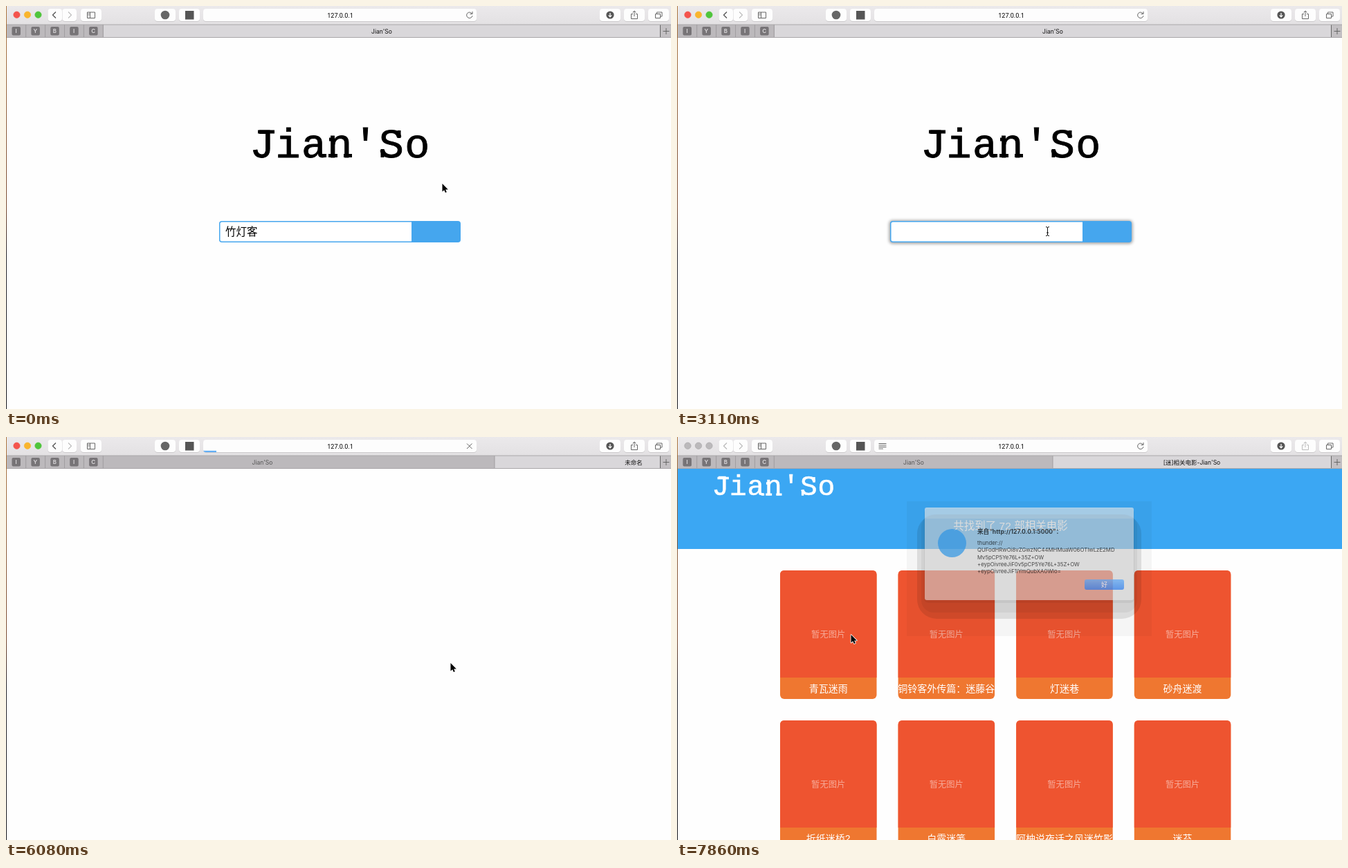
An HTML page for the animation above (8000 ms loop, 961 by 583 pixels).

```html
<!DOCTYPE html>
<html lang="zh-CN">
<head>
<meta charset="utf-8">
<title>Jian'So</title>
<style>
html, body { margin: 0; width: 100%; height: 100%; overflow: hidden; background: #fefefe; }
svg { display: block; width: 961px; height: 583px; }
text { font-family: "Liberation Sans", "Noto Sans CJK SC", "Noto Sans CJK", sans-serif; white-space: pre; }
.mid { text-anchor: middle; }
.tab { font: 8.5px Inter, "Noto Sans CJK SC", "Noto Sans CJK", sans-serif; text-anchor: middle; }
.mark text { font: 60px "Liberation Mono", monospace; letter-spacing: 1.3px; stroke-width: .9; }
.mark path { fill: none; stroke-width: 5; }
.cand { font-size: 13px; font-weight: 300; fill: #555; }
.alert text { font-family: Inter, "Noto Sans CJK SC", "Noto Sans CJK", sans-serif; font-size: 7.8px; }
.line { fill: none; stroke: #666; }
</style>
</head>
<body>
<svg viewBox="0 0 961 583">
  <defs>
    <linearGradient id="bar" x2="0" y2="1"><stop stop-color="#ebe9eb"/><stop offset="1" stop-color="#e3e1e3"/></linearGradient>
    <linearGradient id="edge" x2="0" y2="1">
      <stop stop-color="#b0783f"/><stop offset=".3" stop-color="#8a5a38"/><stop offset=".5" stop-color="#7a4a30"/>
      <stop offset=".62" stop-color="#25242c"/><stop offset="1" stop-color="#15161c"/>
    </linearGradient>
    <linearGradient id="ok" x2="0" y2="1"><stop stop-color="#5aa8f8"/><stop offset="1" stop-color="#2577ee"/></linearGradient>
    <filter id="blur" x="-10%" y="-50%" width="120%" height="200%"><feGaussianBlur stdDeviation="2"/></filter>
    <clipPath id="tabClip"><rect x="141" y="27" width="804" height="18"/></clipPath>
    <clipPath id="urlClip"><rect x="285" y="4" width="395" height="18" rx="4"/></clipPath>
    <g id="word" class="mark">
      <text x="352.3" y="218.5">Jian'So</text>
      <path d="M364 182H388M467 193H475M466 216.5H479M488 216.5H500M457 216.5H463M568 180V191M544 207V219"/>
    </g>
  </defs>
  <rect width="961" height="583" fill="#fefefe"/>

  <g id="home">
    <use href="#word" fill="#000" stroke="#000"/>
    <rect id="glow" x="306.5" y="310" width="352" height="34" rx="5" fill="#000" opacity=".36" filter="url(#blur)"/>
    <rect x="308" y="311" width="349" height="31" rx="4" fill="#45a6ee"/>
    <path d="M586 312.5V340.5H312Q309.5 340.5 309.5 338V315Q309.5 312.5 312 312.5Z" fill="#fff"/>
    <text id="query" x="317" y="332" font-size="15.5"></text>
    <rect id="under" x="317" y="334" height="1"/>
    <rect id="caret" y="317" width="1" height="19"/>
    <g id="ime">
      <rect id="panel" x="317" y="342" height="22" fill="#fff"/>
      <g id="cands"></g>
      <g id="badge">
        <path d="M-31.5-4l2-2 2 2z" fill="#bbb"/><path d="M-31.5 2l2 2.5 2-2.5z" fill="#f0703a"/>
        <circle cy="1" r="17.5" fill="#000" opacity=".14"/><circle r="17" fill="#fff"/><circle r="15.8" fill="#ec6030"/>
      </g>
    </g>
  </g>

  <g id="results">
    <rect y="45" width="961" height="117" fill="#3ba7f3"/>
    <use href="#word" fill="#fff" stroke="#fff" transform="translate(-190.5 -65) scale(.684)"/>
    <text class="mid" x="482" y="134" font-size="15.5" fill="#fff">共找到了 72 部相关电影</text>
    <g id="cards"></g>
  </g>

  <rect width="961" height="27" fill="url(#bar)"/>
  <rect y="27" width="961" height="18" fill="#bcb9bc"/>
  <g clip-path="url(#tabClip)">
    <rect id="tabB" y="27" width="804" height="18" fill="#d9d7da"/>
    <rect id="tabLine" y="27" width="1" height="18" fill="#a09da0"/>
    <text id="nameA" class="tab" y="39.5">Jian'So</text>
    <text id="nameB" class="tab" y="39.5" fill="#111"></text>
  </g>
  <rect y="26.5" width="961" height="1" fill="#aaa7aa"/>
  <rect y="45" width="961" height="1" fill="#a9a6a9"/>
  <rect x="945" y="28" width="16" height="17" fill="#c3c0c3"/>
  <path d="M945.5 27.5V45M949.5 36.5H958.5M954 32V41" class="line"/>
  <g id="pins"></g>
  <g id="lights"></g>
  <g id="buttons"></g>
  <path id="back" class="line" d="M72 8.5L67.5 13 72 17.5" stroke-width="1.3"/>
  <path class="line" d="M90 8.5L94.5 13 90 17.5" stroke-width="1.1" style="stroke:#bbb"/>
  <path class="line" d="M117.5 9H128.5V17.5H117.5ZM121.5 9V17.5M118.5 11H120.5M118.5 13H120.5"/>
  <circle cx="230" cy="13" r="6.3" fill="#666"/>
  <rect x="259" y="7" width="12.5" height="12.5" fill="#555"/>
  <text class="mid" x="483" y="17" style="font:9px Roboto,sans-serif">127.0.0.1</text>
  <path id="reader" class="line" d="M291.5 9.5H302.5M291.5 12H302.5M291.5 14.5H302.5M291.5 17H298"/>
  <path id="reload" class="line" d="M673.5 11.2A4.2 4.2 0 1 0 674 14M674 8V11.5H670.5"/>
  <path id="stop" class="line" d="M666 9.5L673.5 17M673.5 9.5L666 17"/>
  <g clip-path="url(#urlClip)"><rect id="load" x="285" y="19.8" height="2.2"/></g>
  <circle cx="873" cy="13" r="5.6" fill="#555"/>
  <path d="M873 10V15.5M870.7 13.4L873 15.8 875.3 13.4" fill="none" stroke="#fff" stroke-width="1.2"/>
  <path id="share" class="line" d="M906 11.5H903.5V18.5H912.5V11.5H910M908 15V7.5M905.5 9.5L908 7 910.5 9.5"/>
  <path class="line" d="M938.5 11.5H945.5V17.5H938.5ZM940.5 11.5V9H948V15H945.5"/>
  <rect width="1" height="583" fill="url(#edge)"/>

  <g id="alert" class="alert">
    <path d="M332 93H686V288H332Z" opacity=".035"/>
    <rect x="347" y="112" width="324" height="151" rx="28" opacity=".1"/>
    <rect x="353" y="112" width="312" height="142" rx="18" opacity=".05"/>
    <rect x="357" y="104" width="304" height="136" rx="6" opacity=".05"/>
    <rect x="358" y="102" width="302" height="134" rx="3" fill="#efefef" opacity=".52"/>
    <rect x="358" y="102" width="302" height="16" rx="3" fill="#ddd" opacity=".2"/>
    <g opacity=".68">
      <circle cx="397.5" cy="153.5" r="20.5" fill="#2a93e4"/>
      <text x="434" y="139.5" style="font-size:8.6px;font-weight:700">来自“http://127.0.0.1:5000”：</text>
      <g id="link"></g>
      <rect x="589" y="206" width="57" height="15" rx="3" fill="url(#ok)"/>
      <text class="mid" x="617.5" y="217" fill="#fff" style="font-size:9px">好</text>
    </g>
  </g>

  <g id="cursor">
    <g id="arrow">
      <path d="M0 0V11.6L2.7 9.2 4.4 13 6.3 12.2 4.7 8.4H8.3Z" stroke="#fff" stroke-width="1.6" stroke-linejoin="round" paint-order="stroke"/>
    </g>
    <path id="beam" d="M-2.5-6.5Q0-6.5 0-5V5Q0 6.5-2.5 6.5M2.5-6.5Q0-6.5 0-5V5Q0 6.5 2.5 6.5M-1.5 2H1.5" fill="none" stroke="#111" stroke-width="1"/>
    <path id="hand" d="M-3.2 1V-5Q-3.2-6.4-2-6.4T-.8-5V-1.8Q.6-2.8 1.5-1.6 2.8-2.3 3.6-1 5.3-1.2 5.3.6V3Q5 5 4 6.5H-1.5Q-2.4 4.6-4.9 1.8-5.8.3-4.6-.1-3.8 0-3.2 1ZM.2 2V4.5M2 2V4.5" fill="#fff" stroke="#111" stroke-width="1" stroke-linejoin="round"/>
  </g>
</svg>
<script>
const $ = id => document.getElementById(id);
const set = (id, attrs) => { for (const k in attrs) $(id).setAttribute(k, attrs[k]); };
const show = (id, on) => { $(id).style.display = on ? "" : "none"; };
const fill = (id, list, draw) => { $(id).innerHTML = list.map(draw).join(""); };
const at = (table, t) => table.filter(row => row[0] <= t).pop();

const LOOP = 8000;
const films = ["青瓦迷雨", "铜铃客外传篇：迷藤谷", "灯迷巷", "砂舟迷渡",
  "折纸迷桥2", "白露迷笺", "阿柚说夜话之风迷竹影", "迷苔"];
const link = ["thunder://", "QUFodHRwOi8vZGwzNC44MHMuaW06OTIwLzE2MD", "Mv5pCP5Ye76L+35Z+OW",
  "+eypOivreeJiF0v5pCP5Ye76L+35Z+OW", "+eypOivreeJiF1lYmQubXA0Wlo="];

// time, shape, x, y
const pointer = [
  [0, "arrow", 630.5, 257], [600, "arrow", 626, 260], [740, "arrow", 612, 272], [890, "arrow", 590, 291],
  [1040, "beam", 566, 318], [1190, "beam", 544, 325], [1330, "beam", 535.5, 326],
  [5050, "hand", 600, 335], [5190, "hand", 632, 339.5], [5340, "hand", 652, 338], [5490, "hand", 657, 335],
  [5640, "hand", 651, 333], [5790, "hand", 646, 333], [6080, "arrow", 642.5, 327],
  [6670, "hand", 615, 330], [6820, "hand", 540, 328], [6970, "hand", 450, 326], [7110, "hand", 367, 324],
  [7260, "arrow", 300, 303], [7410, "hand", 253.5, 294], [7710, "arrow", 251.5, 286]
];
// time, text, caret x (0 = hidden)
const typing = [
  [0, "竹灯客", 0], [1330, "竹灯客", 364], [1770, "竹灯客", 0], [2220, "竹灯", 348], [2370, "竹", 333],
  [2660, "", 317], [3110, "", 0], [3560, "m", 330], [3700, "mi", 333.5], [4300, "迷", 333],
  [4750, "迷", 0], [5340, "迷", 333], [5790, "迷", 0]
];
// time, left edge of the new tab, centre of the old tab's name, progress width
const tabs = [
  [0, 141, 543, 0], [6080, 706, 370.5, 19], [6230, 559, 341.5, 82], [6370, 543, 342, 180],
  [6520, 543, 342, 394], [6670, 543, 342, 0]
];
const offers = {
  m: { words: ["吗", "没有", "妈妈", "美丽", "每天"], shift: 58 },
  mi: { words: ["迷", "米", "密", "咪", "蜜"], shift: 0 }
};

fill("cards", films, (name, i) => {
  const x = 149 + i % 4 * 170.6, y = i < 4 ? 193 : 410, mid = x + 69.7;
  return `<rect x="${x}" y="${y}" width="139.5" height="186" rx="6" fill="#ef7730"/>
    <path d="M${x} ${y + 155}v-149q0-6 6-6h127.5q6 0 6 6v149z" fill="#ee5430"/>
    <text class="mid" x="${mid}" y="${y + 97}" font-size="12.3" fill="#fff" opacity=".5">暂无图片</text>
    <text class="mid" x="${mid}" y="${y + 175.5}" font-size="14" fill="#fff">${name}</text>`;
});
fill("pins", [..."IYBIC"], (c, i) => {
  const x = 14.5 + i * 27.9;
  return `<rect x="${x - 6}" y="30" width="12.5" height="12.5" rx="2" fill="#777477"/>
    <text class="tab" x="${x}" y="39.3" fill="#dedcde" style="font-weight:600;font-size:8px">${c}</text>
    <rect x="${x + 13.7}" y="27" width="1" height="18" fill="#a09da0"/>`;
});
fill("lights", [15.5, 31, 46.5], x => `<circle cx="${x}" cy="12.7" r="4.7" stroke-width=".6"/>`);
fill("buttons", [[60.5, 20.5], [81.5, 20.5], [108, 30], [215, 30], [250, 30], [285, 395], [858, 30], [893, 30], [928, 30]],
  ([x, w]) => `<rect x="${x}" y="4.8" width="${w}" height="18" rx="4" fill="#c3c1c3"/>
    <rect x="${x}" y="4" width="${w}" height="18" rx="4" fill="#fdfdfd"/>`);
fill("link", link, (s, i) => `<text x="434" y="${156.3 + i * 10.1}">${s}</text>`);

function drawOffer(text) {
  const offer = offers[text];
  show("ime", offer);
  if (!offer) return;
  let x = 323;
  fill("cands", offer.words, (w, i) => {
    const item = `<text class="cand" x="${x}" y="356.5"${i ? "" : ' style="fill:#f07040"'}>${i + 1}.${w}</text>`;
    x += 17.8 + 13 * w.length;
    return item;
  });
  set("badge", { transform: `translate(${509 + offer.shift} 351)` });
  set("panel", { width: 192 + offer.shift });
}

let shown = null;
function drawTyping(t) {
  const [, text, caret] = at(typing, t);
  if (text !== shown) {
    shown = text;
    $("query").textContent = text;
    drawOffer(text);
    show("under", offers[text]);
    set("under", { width: text === "m" ? 13 : 16.5 });
  }
  show("caret", caret);
  set("caret", { x: caret });
  show("glow", t >= 1330);
}

function drawTabs(t) {
  const [, left, nameX, load] = at(tabs, t);
  const two = t >= 6080, loaded = t >= 6230;
  set("tabB", { x: left });
  set("tabLine", { x: left - .5 });
  show("tabLine", two);
  set("nameA", { x: nameX, fill: two ? "#555" : "#111" });
  set("nameB", { x: left + 201 });
  $("nameB").textContent = !two ? "" : loaded ? "[迷]相关电影-Jian'So" : "未命名";
  set("load", { width: load, fill: loaded ? "#1f85ee" : "#62aef5" });
  show("stop", load);
  show("reload", !load);
  show("reader", two && t >= 6670);
  $("back").style.stroke = loaded ? "#bbb" : "#555";
}

function drawAlert(t) {
  const modal = t >= 7710;
  show("alert", modal);
  set("alert", { opacity: t >= 7860 ? 1 : .35 });
  $("share").style.stroke = modal ? "#bbb" : "#666";
  const colors = modal ? ["#bbb9bb", "#bbb9bb", "#bbb9bb"] : ["#f4544d", "#f9b52e", "#4fc53c"];
  [...$("lights").children].forEach((c, i) => {
    c.setAttribute("fill", colors[i]);
    c.setAttribute("stroke", modal ? "#a5a3a5" : colors[i]);
  });
}

function drawPointer(t) {
  const [, shape, x, y] = at(pointer, t);
  for (const id of ["arrow", "beam", "hand"]) show(id, id === shape);
  set("cursor", { transform: `translate(${x} ${y})` });
}

const start = performance.now();
function frame() {
  const t = (performance.now() - start) % LOOP;
  show("home", t < 6080);
  show("results", t >= 6230);
  drawTyping(t);
  drawTabs(t);
  drawAlert(t);
  drawPointer(t);
  requestAnimationFrame(frame);
}
frame();
</script>
</body>
</html>
```
